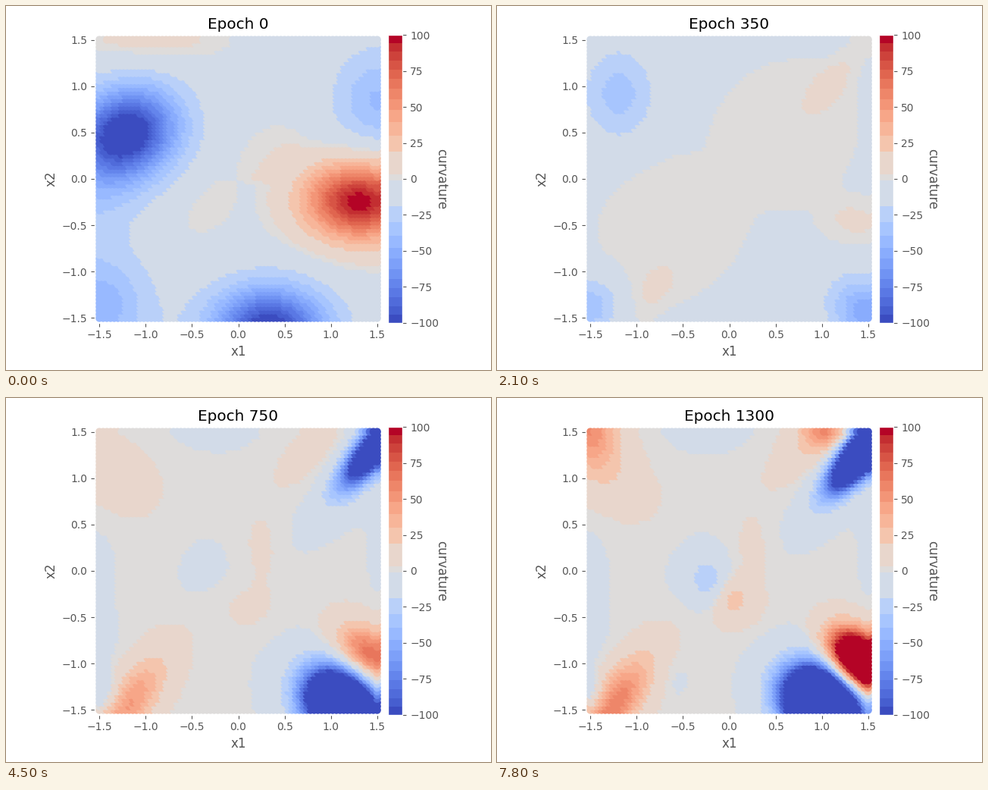
A matplotlib script for the animation above (8000 ms loop, 640x480 px).

```python
import numpy as np
import matplotlib.pyplot as plt
from matplotlib.animation import FuncAnimation
from matplotlib.colors import BoundaryNorm, ListedColormap

W, H = 640, 480
GREY = "#555555"
EPOCH_STEP = 50
LIMIT = 1.55

plt.rcParams.update({
    "font.family": "DejaVu Sans", "font.size": 10, "axes.titlesize": 14.4,
    "axes.labelsize": 12, "axes.labelcolor": GREY, "axes.edgecolor": "white",
    "axes.linewidth": 1, "xtick.color": GREY, "ytick.color": GREY,
})

# Colour bands get narrower towards the ends of the scale
steps = 100 * (np.arange(1, 13) / 12) ** 0.67
bounds = np.concatenate([-steps[::-1], [-1, 3.4], steps])
mids = (bounds[1:] + bounds[:-1]) / 2
mids[0], mids[-1] = -100, 100
mids[abs(mids) < 12] *= 0.8
cmap = ListedColormap(plt.get_cmap("coolwarm")((mids + 100) / 200))
norm = BoundaryNorm(bounds, cmap.N)

side = np.linspace(-1.5, 1.5, 76)
X, Y = (a.ravel() for a in np.meshgrid(side, side))
RADIUS, THETA = np.hypot(X, Y), np.arctan2(Y, X)


def fall(t, end):
    return max(0, 1 - t / end)


def rise(t, start, tau):
    return 1 - np.exp(-max(0, t - start) / tau)


def pulse(t, end):
    return np.sin(np.pi * min(t / end, 1))


def logistic(z):
    return 1 / (1 + np.exp(-np.clip(z, -40, 40)))


def hill(height, x, y, rx, ry, angle=0):
    """Rotated Gaussian whose half-height contour has radii rx, ry."""
    c, s = np.cos(np.radians(angle)), np.sin(np.radians(angle))
    u = (X - x) * c + (Y - y) * s
    v = (Y - y) * c - (X - x) * s
    return height * np.exp2(-(u / rx) ** 2 - (v / ry) ** 2)


def flat_land(t):
    """Near-zero region: two lobes on the diagonal that grow over the stage."""
    reach = np.interp(t, [0, 200, 550, 750], [0.25, 0.95, 1.3, 3.2])
    edge = reach + 0.6 * np.cos(2 * (THETA - np.radians(40)))
    return -5 + 6 * logistic((edge - RADIUS) / 0.08)


def early(t):
    """Features that fade out."""
    fade = fall(t, 200)
    return (hill(-100 * fall(t, 500), -1.18, 0.52 + 0.0012 * t,
                 0.5 - 0.0005 * t, 0.42, 25 * fade)
            + hill(-20 * fade, -1.55, -0.1, 0.45, 0.6)
            + hill(-100 * fade, 0.35, -1.6, 0.54, 0.4)
            + hill(-36 * fade, 1.52, 0.85, 0.42, 0.5)
            + hill(16 * fade, -0.95, 1.58, 0.65, 0.28)
            + hill(8 * pulse(t, 550), 1.25, 1.22, 0.5, 0.16, 50)
            + hill(5.5 * pulse(t, 400), 0.1, -0.13, 0.52, 0.3, 40))


def corners(t):
    """Wells and ridges that settle into the corners."""
    shrink = np.exp(-t / 300)
    shift = logistic((t - 450) / 120)
    growth = np.clip((t - 350) / 950, 0, 1) ** 1.3
    slide = np.exp(-max(0, t - 350) / 300)
    left_rise = rise(t, 500, 200)
    return (hill(10 + 95 * fall(t, 200) + 210 * growth, 1.32 + 0.12 * shift,
                 -0.2 - 0.77 * shift, 0.32 + 0.2 * shrink, 0.21 + 0.16 * shrink, -45 * shift)
            + hill(-320 * rise(t, 300, 300), 1 + 0.5 * slide, -1.42, 0.36, 0.29, -40)
            + hill(-300 * rise(t, 450, 350), 1.5, 1.36, 0.45, 0.15, 50)
            + hill(70 * rise(t, 750, 300), 1.08, 1.6, 0.27, 0.19, 45)
            + hill(75 * rise(t, 320, 320), -1.32 + 0.28 * slide, -1.5, 0.56, 0.21, 53)
            + hill(-28 - 12 * shrink, -1.48, -1.36, 0.18 + 0.3 * shrink, 0.2 + 0.28 * shrink, 40)
            + hill(12 * rise(t, 400, 80), -1.32, 1.06, 0.2 + 0.26 * left_rise, 0.28, -38)
            + hill(65 * rise(t, 800, 300), -1.52, 1.58, 0.27, 0.37, 20))


def late(t):
    """Shallow bumps that appear once the surface has flattened."""
    shallow = (hill(5.5, 0.27, 0.25, 0.2, 0.33) + hill(5.5, 0.08, -0.38, 0.34, 0.25)
               + hill(-4, -0.32, -0.04, 0.35, 0.44)
               + hill(6, 0.8, 1.32, 0.5, 0.26, 45)
               + hill(-4, 1, 0.65, 0.65, 0.28, 38) + hill(-4, 1.55, 0.15, 0.15, 0.45)
               + hill(-4, 0.65, -1.2, 0.45, 0.62) + hill(-4, -0.2, 1.6, 0.62, 0.33)
               + hill(-4, -1.55, 0.1, 0.25, 0.45) + hill(-4, -1.5, -0.85, 0.27, 0.45))
    spots = (hill(-30, -0.22, -0.07, 0.16, 0.2) + hill(22, 0.06, -0.28, 0.16, 0.18)
             + hill(-5, -0.58, -1.12, 0.14, 0.22))
    return rise(t, 450, 130) * shallow + rise(t, 950, 150) * spots


def curvature(t):
    return np.clip(flat_land(t) + early(t) + corners(t) + late(t), -99.9, 99.9)


def px_axes(left, top, right, bottom):
    return fig.add_axes([left / W, 1 - bottom / H, (right - left) / W, (bottom - top) / H])


fig = plt.figure(figsize=(W / 100, H / 100), dpi=100, facecolor="white")
ax = px_axes(117.2, 38.4, 495.8, 417.6)
ax.set(xlim=(-LIMIT, LIMIT), ylim=(-LIMIT, LIMIT), xlabel="x1", ylabel="x2")
ticks = np.arange(-1.5, 1.6, 0.5)
ax.set_xticks(ticks)
ax.set_yticks(ticks)
title = ax.set_title("Epoch 0", color="black")
dots = ax.scatter(X, Y, s=56, c=curvature(0), cmap=cmap, norm=norm, linewidths=0)

bar = fig.colorbar(dots, cax=px_axes(504.4, 38.4, 523.4, 417.6), spacing="proportional")
bar.set_ticks(np.arange(-100, 101, 25))
bar.ax.minorticks_off()
bar.outline.set_edgecolor("white")
fig.text(574.5 / W, 1 - 228 / H, "curvature", color=GREY, fontsize=12,
         rotation=270, ha="center", va="center")


def draw(i):
    epoch = EPOCH_STEP * (i // 3)
    dots.set_array(curvature(epoch))
    title.set_text(f"Epoch {epoch}")
    return dots, title


anim = FuncAnimation(fig, draw, frames=80, interval=100, repeat=True, repeat_delay=0)
plt.show()
```
